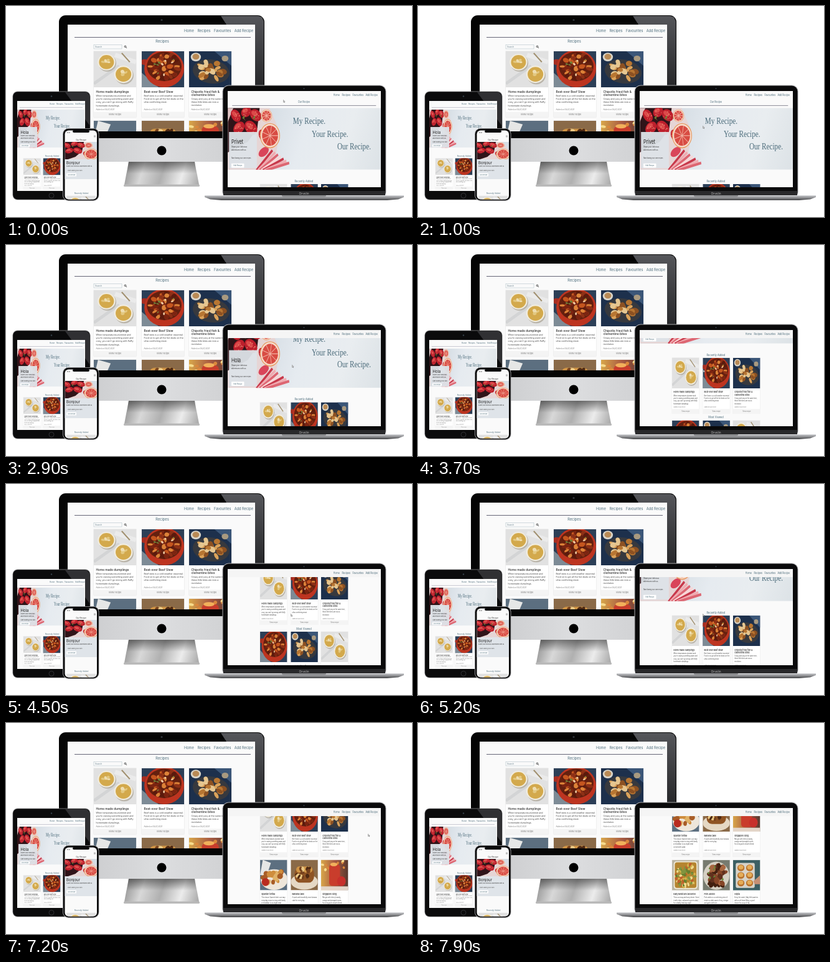
An HTML page with a canvas that plays this animation: 652x340 px, repeating every 8000 ms.

```html
<!DOCTYPE html>
<html lang="en">
<head>
<meta charset="utf-8">
<title>Recipe site on four devices</title>
<style>
html, body { margin: 0; width: 100%; height: 100%; overflow: hidden; background: #fff; }
canvas { display: block; }
</style>
</head>
<body>
<canvas id="stage" width="652" height="340"></canvas>
<script>
const c = document.getElementById('stage').getContext('2d');
const SANS = 'Inter, "Open Sans", sans-serif', SERIF = '"Liberation Serif", serif';
const TEAL = '#4b6b7a', INK = '#333', LOOP = 8000, STEP = 100;

let seed = 1;
const rnd = () => (seed = seed * 16807 % 2147483647) / 2147483647;

function rect(x, y, w, h, fill, r = 0) {
  c.fillStyle = fill;
  c.beginPath();
  c.roundRect(x, y, w, h, r);
  c.fill();
}
function oval(x, y, rx, ry, fill, turn = 0) {
  c.fillStyle = fill;
  c.beginPath();
  c.ellipse(x, y, rx, ry, turn, 0, 7);
  c.fill();
}
function poly(fill, ...p) {
  c.fillStyle = fill;
  c.beginPath();
  for (let i = 0; i < p.length; i += 2) c.lineTo(p[i], p[i + 1]);
  c.fill();
}
function line(x1, y1, x2, y2, color, width = 1) {
  c.strokeStyle = color;
  c.lineWidth = width;
  c.beginPath();
  c.moveTo(x1, y1);
  c.lineTo(x2, y2);
  c.stroke();
}
function text(s, x, y, size, color = INK, align = 'left', weight = 400, font = SANS) {
  c.font = `${weight} ${size}px ${font}`;
  c.fillStyle = color;
  c.textAlign = align;
  c.fillText(s, x, y);
}
function gradient(x1, y1, x2, y2, ...colors) {
  const g = c.createLinearGradient(x1, y1, x2, y2);
  colors.forEach((k, i) => g.addColorStop(i / (colors.length - 1), k));
  return g;
}
function clipped(x, y, w, h, r, draw) {
  c.save();
  c.beginPath();
  c.roundRect(x, y, w, h, r);
  c.clip();
  draw();
  c.restore();
}
function placed(x, y, sx, sy, draw) {
  c.save();
  c.translate(x, y);
  c.scale(sx, sy);
  draw();
  c.restore();
}
// Random blobs inside an ellipse
function scatter(n, x, y, rx, ry, size, colors) {
  for (let i = 0; i < n; i++) {
    const a = rnd() * 6.28, d = Math.sqrt(rnd());
    oval(x + Math.cos(a) * d * rx, y + Math.sin(a) * d * ry,
      size * (.7 + rnd() * .6), size * (.5 + rnd() * .5), colors[i % colors.length], a);
  }
}

// Dishes, each in a unit square
function bowl(x, y, r) {
  oval(x + .02, y + .03, r, r * 1.12, '#b9b4aa');
  oval(x, y, r, r * 1.1, '#f1ecde');
  oval(x, y, r * .84, r * .93, '#d3a94c');
  scatter(4, x, y, r * .35, r * .35, r * .22, ['#eeddb0', '#e3c880']);
}
const dishes = [
  () => {
    rect(0, 0, 1, 1, '#e1e1e1');
    line(0, .9, .6, .4, '#d3d4d5', .08);
    line(.5, .1, 1, .3, '#ebebeb', .12);
    bowl(.3, .3, .21);
    bowl(.7, .64, .22);
    line(.66, .05, .85, .3, '#a08f6e', .03);
  },
  () => {
    rect(0, 0, 1, 1, '#2c3f57');
    poly('#7d8b96', 0, .6, .4, 1, 0, 1);
    oval(.07, .3, .1, .08, '#a52e22');
    oval(.53, .48, .47, .52, '#bd3420');
    oval(.53, .42, .41, .41, '#64200f');
    scatter(60, .53, .42, .36, .36, .06, ['#8d3016', '#c4561f', '#5b1a0d', '#dc8238', '#7b2411']);
    scatter(9, .53, .42, .3, .3, .03, ['#71803a', '#f0c9a0']);
  },
  () => {
    rect(0, 0, 1, 1, '#1d304c');
    poly('#3b5678', .6, 0, 1, 0, 1, .4);
    oval(.16, .16, .12, .12, '#d9d4c8');
    oval(.16, .15, .08, .08, '#b98a55');
    oval(.52, .56, .44, .33, '#37393e', .25);
    scatter(24, .51, .53, .34, .25, .08, ['#b87632', '#dca35a', '#8d5122', '#e6c690']);
    oval(.85, .2, .08, .08, '#a99a80');
  },
  () => {
    rect(0, 0, 1, 1, '#5c6f80');
    poly('#e6e7e6', .1, 0, .4, .1, .25, .5, 0, .5);
    oval(.52, .65, .5, .34, '#eee6da');
    scatter(16, .52, .58, .38, .24, .11, ['#cf8d3d', '#e0b268', '#a85d27']);
    oval(.2, .73, .14, .13, '#b92c20');
  },
  () => {
    rect(0, 0, 1, 1, '#8a6a48');
    oval(.5, .72, .5, .26, '#e5d8c4');
    rect(.14, .25, .72, .5, '#8f5424', .2);
    rect(.2, .22, .6, .2, '#cf9445', .1);
    scatter(16, .5, .42, .32, .18, .07, ['#74401d', '#e9c783', '#4e2a14']);
  },
  () => {
    rect(0, 0, 1, 1, gradient(0, 0, 1, 0, '#d8a64a', '#a85a42', '#57392f'));
    scatter(12, .5, .2, .5, .2, .05, ['#f7dc8d', '#db883c']);
    rect(.3, .15, .4, .7, '#c93d2c', .1);
    oval(.47, .15, .13, .06, '#f2b05b');
    oval(.75, .7, .16, .16, '#c7302b');
    rect(0, .87, 1, .13, '#e3d5c8');
  },
  () => {
    rect(0, 0, 1, 1, '#b9b4a2');
    rect(.06, .04, .88, .92, '#eee9d8', .1);
    rect(.1, .08, .8, .84, '#b5852f', .08);
    scatter(80, .5, .5, .38, .4, .055, ['#d6b34b', '#81943f', '#c05f2b', '#eed98e', '#66802f']);
  },
  () => {
    rect(0, 0, 1, 1, '#777b70');
    oval(.5, .52, .48, .46, '#d5d0c3');
    scatter(32, .5, .52, .36, .34, .11, ['#60301d', '#854527', '#43200f', '#a86640']);
    scatter(7, .5, .5, .34, .34, .04, ['#65883a']);
  },
  () => {
    rect(0, 0, 1, 1, '#3c5f63');
    rect(.1, .1, .7, .82, '#d8d3c8', .06);
    for (let i = 0; i < 6; i++) {
      const x = .29 + i % 2 * .32, y = .26 + (i >> 1) * .25;
      oval(x, y, .13, .11, '#b9722d');
      oval(x, y - .02, .09, .07, '#e5ad58');
    }
    poly('#c69073', .75, .7, 1, .5, 1, .8, .8, .8);
  }
];
function food(k, x, y, w, h) {
  seed = 977 + k * 5881;
  clipped(x, y, w, h, 0, () => placed(x, y, w, h, dishes[k]));
}

const recipes = [
  ['Home made dumplings', 'When temperatures plummet and|you’re craving something warm and|cozy, you can’t go wrong with fluffy|homemade dumplings.'],
  ['Best-ever Beef Stew', 'Beef stew is a cold weather essential.|Food on to get all the hot deals on the|ultra comforting meat.'],
  ['Chipotle fried fish &|clementine bites', 'Crispy and juicy at the same time,|these little bites are now a|revolution.'],
  ['Spanish tortilla', 'This classic Spanish dish is an easy|everyday recipe to enjoy with family|at breakfast or as a light meal|served with salad.'],
  ['Banana Cake', 'A quick and beautifully moist banana|cake for every day.'],
  ['Singapore sling', 'Mix gin with cherry brandy,|orange and pineapple juices|for a long and colourful drink.'],
  ['Easy Mexican Casserole', 'This is an easy and tasty dinner. Serve|it with chips, salsa and a green salad,|for a family meal any night.'],
  ['Pork Adobo', 'Pork adobo is a comforting stew of|meat in a dark sauce of soy, vinegar|and garlic with rice.'],
  ['Hopia', 'Enjoy the sweet, flaky little pastries|with a soft bean filling, a good|choice for a cup of tea.']
];
const COLS = [141, 218, 294];
function card(k, x, y) {
  rect(x - .5, y - .5, 69, 107, '#e4e4e4');
  rect(x, y, 68, 106, '#fff');
  food(k, x, y, 68, 58);
  const [name, body] = recipes[k];
  let ty = y + 67;
  for (const s of name.split('|')) { text(s, x + 3.5, ty, 4.8, '#222', 'left', 500); ty += 5; }
  ty += 1;
  for (const s of body.split('|')) { text(s, x + 3.5, ty, 3.55, '#444'); ty += 5.2; }
  text('Added on 06/07/2021', x + 3.5, y + 95.2, 2.9, '#777');
  rect(x, y + 97.5, 68, 8.5, '#f4f4f4');
  text('View recipe', x + 34, y + 103, 3.7, '#777', 'center');
}
const row = (ks, y) => ks.forEach((k, i) => card(k, COLS[i], y));

function nav(pad) {
  text('Home', 286 + pad, 42, 5.6, TEAL);
  text('Recipes', 307.5 + pad, 42, 5.6, TEAL);
  text('Favourites', 334 + pad, 42, 5.6, TEAL);
  text('Add Recipe', 397 + pad, 42, 5.6, TEAL, 'right');
}
function heading(title, pad, titleY, lineY) {
  line(110 - pad, lineY, 393 + pad, lineY, '#667');
  text(title, 251, titleY, 5.7, TEAL, 'center');
}
function recipePage(pad) {
  heading('Recipes', pad, 59, 50.5);
  c.strokeStyle = '#a9bac2';
  c.lineWidth = .5;
  c.strokeRect(141, 62.5, 45, 6.5);
  text('Search', 143, 67.1, 3.4, '#6d8591');
  c.strokeStyle = '#222';
  c.lineWidth = .8;
  c.beginPath();
  c.arc(191.5, 65.3, 1.3, 0, 7);
  c.stroke();
  line(192.5, 66.3, 194, 68, '#222', .8);
  for (let r = 0; r < 3; r++) row([r * 3, r * 3 + 1, r * 3 + 2], 73 + r * 112);
}

function strawberry(x, y, r, turn) {
  oval(x, y, r, r * .72, '#bd1f2c', turn);
  oval(x - r * .2, y - r * .2, r * .55, r * .3, '#dc4a4a', turn);
  seed = Math.round(x * 31 + y);
  scatter(9, x, y, r * .7, r * .55, r * .07, ['#f0a080']);
}
function grapefruit(x, y, rx, ry) {
  oval(x, y, rx, ry, '#e69a62');
  oval(x, y, rx * .93, ry * .93, '#f7dccb');
  oval(x, y, rx * .8, ry * .8, '#d84c43');
  for (let a = 0; a < 6.2; a += .7)
    line(x, y, x + Math.cos(a) * rx * .8, y + Math.sin(a) * ry * .8, '#f3b3a3', 1.3);
}
function fruit() {
  poly('#e6d5d5', 60, 65, 165, 65, 190, 110, 175, 183, 60, 183);
  poly('#301419', 60, 65, 140, 65, 134, 104, 110, 130, 60, 150);
  poly('#dfc3c4', 60, 65, 74, 65, 60, 92);
  strawberry(80, 80, 14, .7);
  strawberry(106, 73, 13, -.3);
  strawberry(130, 79, 15, .4);
  strawberry(88, 103, 15, -.5);
  strawberry(118, 103, 17, .5);
  strawberry(146, 117, 11, 1.1);
  for (const x of [96, 122, 142]) poly('#6c8438', x, 84, x + 7, 79, x + 5, 86, x + 10, 90);
  grapefruit(157, 80, 14, 12);
  for (let i = 0; i < 7; i++)
    line(132 + i * 4, 184, 172 + i * 7, 146 + i * 4, ['#c8394b', '#f0aab0', '#dd6672', '#f9d6d6'][i % 4], 5);
  oval(150, 149, 14, 8, '#d9455a', -.5);
  grapefruit(166, 118, 25, 24);
}
function hero() {
  clipped(60, 65, 384, 118, 0, () => {
    rect(60, 65, 384, 118, gradient(160, 65, 444, 183, '#d5dde4', '#e6ebf0', '#e9edf0', '#dce2e6'));
    fruit();
    text('My Recipe.', 223.5, 95.5, 17.5, TEAL, 'left', 400, SERIF);
    text('Your Recipe.', 270.5, 120.5, 17.5, TEAL, 'left', 400, SERIF);
    text('Our Recipe.', 334.5, 144, 17.5, TEAL, 'left', 400, SERIF);
  });
}
function homePage(pad, word) {
  heading('Our Recipe', pad, 55.7, 60.6);
  hero();
  rect(63, 111, 70, 69, 'rgba(222,227,232,.95)');
  text(word, 69, 133.5, 11, '#222');
  text('Share your delicious', 69, 141, 4.1);
  text('adventures with us.', 69, 147, 4.1);
  text('Start sharing your own recipes', 69, 162, 3.4);
  rect(69, 171, 32, 8, '#fff', 1);
  text('Add Recipe', 85, 176.5, 4, TEAL, 'center');
  text('Recently Added', 251, 206.5, 6.2, TEAL, 'center');
  row([0, 1, 2], 210.5);
  text('Most Viewed', 251, 326, 6.2, TEAL, 'center');
  row([1, 2, 0], 330);
}

function desktop() {
  rect(85, 15, 330, 236, gradient(85, 0, 415, 0, '#c6c7c9', '#dcdddf', '#cbccce'), 11);
  rect(85, 15, 330, 198, '#050505', [11, 11, 0, 0]);
  poly(gradient(0, 16, 0, 205, '#55565a', '#08080a'),
    345, 16, 405, 16, 411, 18, 414, 25, 414, 205, 399, 205, 399, 30, 354, 30);
  rect(99, 30, 301, 172, '#fafafa');
  oval(250, 22.5, 1.6, 1.6, '#30343a');
  clipped(99, 30, 301, 172, 0, () => { nav(0); recipePage(0); });
  oval(250, 233, 7.5, 7.5, '#000');
  poly(gradient(190, 253, 310, 291, '#8c8c8c', '#d8d8d8', '#b0b0b0', '#ececec', '#a5a5a5'),
    197, 251, 303, 251, 310, 288, 190, 288);
  poly(gradient(0, 251, 0, 270, 'rgba(40,40,40,.55)', 'rgba(40,40,40,0)'), 197, 251, 303, 251, 306, 270, 194, 270);
  rect(189, 287.5, 122, 3.5, '#b9b9b9', 1.5);
}
function tablet() {
  rect(10.5, 137.5, 125, 175, '#8d8d8f', 8);
  rect(11.2, 138.2, 123.6, 173.6, '#0b0b0c', 7.5);
  poly('#303033', 95, 139, 130, 139, 134, 144, 134, 192);
  oval(73, 145.5, 1.2, 1.2, '#34404a');
  c.strokeStyle = '#3c3c40';
  c.lineWidth = .8;
  c.beginPath();
  c.arc(73, 305.5, 4, 0, 7);
  c.stroke();
  rect(18, 153, 109, 145, '#fafafa');
  clipped(18, 153, 109, 145, 0, () => {
    [['Home', 70], ['Recipes', 81], ['Favourites', 94], ['Add Recipe', 111]]
      .forEach(([s, x]) => text(s, x, 159.2, 2.9, TEAL));
    line(22, 163.5, 123, 163.5, '#99a', .5);
    placed(1.1, 133.2, .281, .52, hero);
    rect(20, 195, 30, 33, 'rgba(222,227,232,.95)');
    text('Hola', 23.5, 206, 6, '#222');
    text('Share your delicious', 23.5, 210, 2.4);
    text('adventures with us.', 23.5, 213.5, 2.4);
    text('Start sharing your own', 23.5, 220, 2.2);
    rect(23, 223, 15, 4, '#fff');
    text('Add Recipe', 24.5, 226, 2.2, TEAL);
    text('Recently Added', 74, 242.5, 3, TEAL, 'center');
    placed(-29.8, 146.2, .41, .47, () => row([0, 1, 2], 210.5));
  });
}
function phone() {
  rect(91, 197, 58.5, 117, '#a5a5a8', 9);
  rect(91.8, 197.8, 56.9, 115.4, '#09090a', 8.5);
  clipped(94.5, 200.5, 51.5, 111, 6, () => {
    rect(94, 200, 53, 112, '#fafafa');
    text('9:41', 98, 205, 2.6, '#222');
    for (let i = 0; i < 3; i++) line(141, 209 + i, 144, 209 + i, '#555', .4);
    text('Our Recipe', 120.5, 217, 3.2, '#333', 'center');
    clipped(94, 219, 53, 28, 0, () => placed(62, 195, .45, .37, () => {
      rect(60, 65, 150, 118, '#d5dde4');
      fruit();
    }));
    rect(94, 247, 53, 32, '#dfe4e9');
    text('Bonjour', 97, 255, 6, '#222');
    text('Share your delicious adventures with us.', 97, 259, 2.2);
    text('Start sharing your own', 99, 266, 2.2, '#555');
    rect(97, 269.5, 16, 5, '#fff', .5);
    text('Add Recipe', 99, 273, 2.3, TEAL);
    text('Recently Added', 121, 303, 3, TEAL, 'center');
    food(0, 97, 305.5, 47, 36);
  });
  rect(107, 200, 27, 4, '#09090a', 2);
}
function laptop() {
  rect(347.5, 127.5, 263, 182, '#a9a9ac', 10);
  rect(348.5, 128.5, 261, 181, '#0a0a0b', 9);
  oval(478.5, 133, 1, 1, '#35414c');
  rect(349, 298, 260, 7, '#29292b');
  text('Orvelin', 478.5, 303.8, 4.8, '#bbb', 'center');
  poly(gradient(0, 305, 0, 313, '#c8c9cc', '#8f9093', '#3f4042'),
    319, 305, 639, 305, 639, 308, 630, 311.5, 612, 313, 346, 313, 328, 311.5, 319, 308);
  rect(319, 305, 320, 1, '#d8d9dc');
  rect(443, 305, 71, 3, '#8c8d90', [0, 0, 3, 3]);
}

// Keys are [time, ...values]; values move linearly between them
function track(keys, t) {
  const i = keys.findIndex(k => k[0] > t);
  if (i < 0) return keys[keys.length - 1].slice(1);
  const a = keys[i - 1], b = keys[i], p = (t - a[0]) / (b[0] - a[0]);
  return a.slice(1).map((v, j) => v + (b[j + 1] - v) * p);
}
const scrollKeys = [[0, 0], [2500, 0], [2900, 33.5], [4200, 150], [4600, 150], [5200, 75], [5800, 0],
  [6900, 0], [7200, 45], [7900, 139.5]];
const cursorKeys = [[0, 445, 151], [900, 457, 193], [2900, 459, 193], [4500, 457, 209], [5800, 457, 209],
  [6400, 544, 146], [6900, 544, 146], [7400, 606, 200]];
const PAD = 39, CLICK = 6700;

function laptopScreen(t) {
  const [scroll] = track(scrollKeys, t), [mx, my] = track(cursorKeys, t);
  const word = t < 1400 ? 'Privet' : t < 4500 ? 'Hola' : 'Ni Hao';
  clipped(356, 137, 246, 155, 0, () => {
    rect(356, 137, 246, 155, '#fafafa');
    placed(317.8, 109.2 - scroll, .64, .845, () => t < CLICK ? homePage(PAD, word) : recipePage(PAD));
    rect(356, 137, 246, 13, scroll ? '#f5f5f5' : '#fafafa');
    placed(317.8, 109.2, .64, .845, () => nav(PAD));
    if (t > 6300 && t < 7200) line(539, 146.2, 551, 146.2, TEAL, .5);
    placed(mx, my, 1, 1, () => {
      poly('#777', 0, 0, 0, 4.6, 1.2, 3.6, 2.2, 5, 3, 4.6, 2.2, 3.2, 3.5, 3);
      poly('#fff', .5, 1, .5, 3.6, 1.2, 2.9, 2.5, 2.7);
    });
  });
}

desktop();
tablet();
phone();
laptop();
let shown = -1;
function frame(now) {
  const t = Math.floor(now % LOOP / STEP) * STEP;
  if (t !== shown) laptopScreen(shown = t);
  requestAnimationFrame(frame);
}
frame(0);
</script>
</body>
</html>
```
